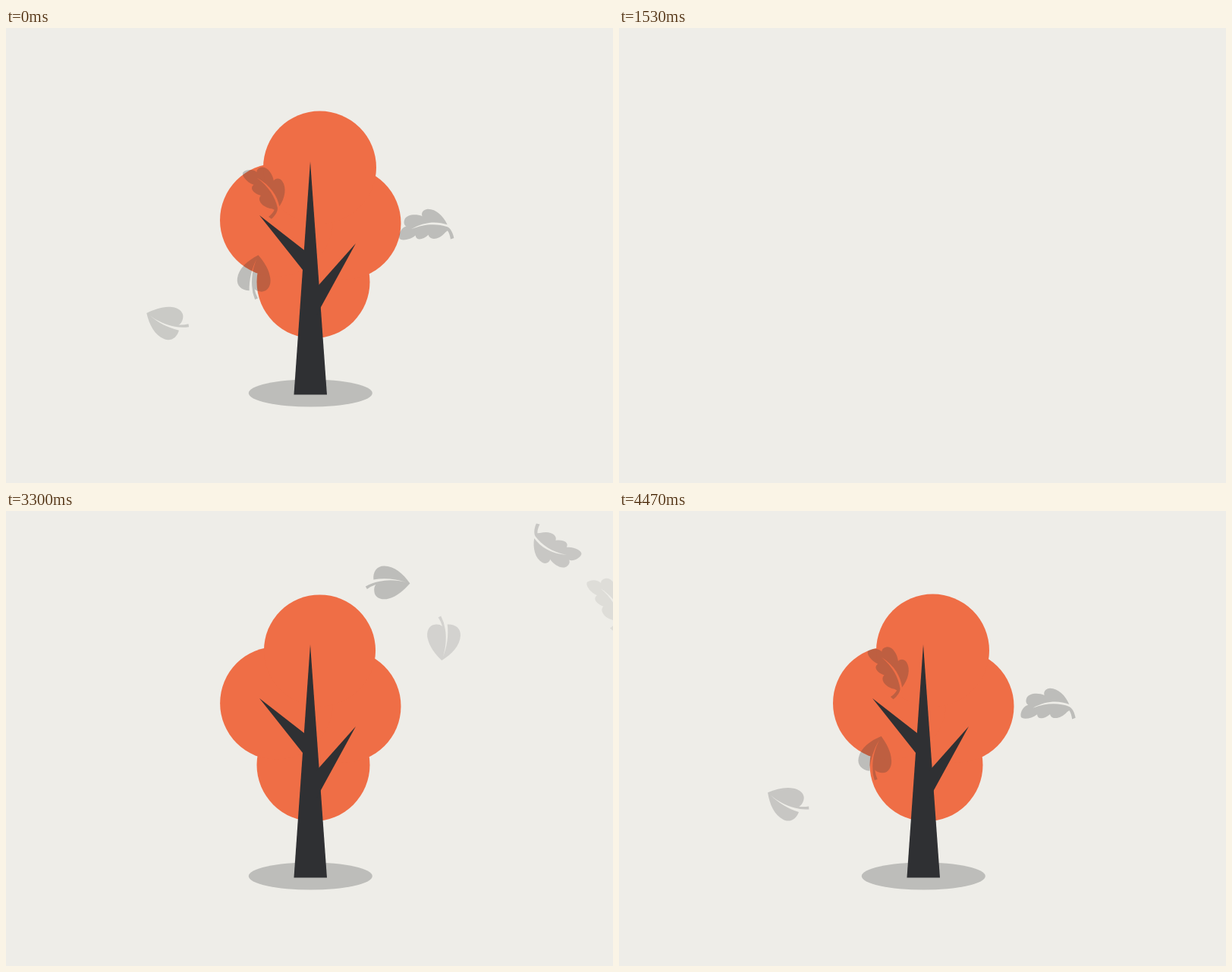
Write an HTML page with a canvas that moves like this. It is 800 px wide and 600 px high and loops after 4.5 s.

```html
<!DOCTYPE html>
<html lang="en">
<head>
<meta charset="utf-8">
<title>Autumn tree</title>
<style>
  html, body { margin: 0; width: 100%; height: 100%; overflow: hidden; background: #eeede8; }
  canvas { display: block; width: 800px; height: 600px; }
</style>
</head>
<body>
<canvas id="stage" width="800" height="600"></canvas>
<script>
const LOOP = 4500, GROUND = 483.5, DEPTH = 310;
const DARK = '#2f3033', ORANGE = '#ef6e46', SHADE = .25;
const ctx = document.getElementById('stage').getContext('2d');

// Leaf outlines around their own centre, with a slit for the vein
const HEART = new Path2D(`M29 1C20-12 8-22-5-22C-15-22-20-14-19-4C-5-6.5 11-5 24-.3
  C12-3.5 0-4-12-1.5Q-21 0-29.5 5L-27.5 8.5Q-22 4.5-16 2.5C-18 5-18.5 8-18 12
  C-17 21-7 23.5 1 21C12 18 21 10 29 1Z`);
const OAK = new Path2D(`M29 0C24-12 14-22 3-21.5C-2-21-5-17-3.5-12.5C-11-16-24-16-27-9
  C-29-4-27-1-25 0C-31 1-36 9-35 15C-34 19-22 19-13.5 12.5C-13 20-4 19 3.5 12.5
  C5 20 17 20 26 10L29 8C31 11 32 15 32.5 19.5L37 18
  C36 11 33 5 29 3C16-2 0-3-19 4C0-6 16-5 29 0Z`);

// Each leaf drifts on a cubic curve that passes its points at these times
const STOPS = [3300, 4050, 4485, 5100];
const leaves = [
  { shape: HEART, angle: 0, spin: -.1315, fadeAt: 4370,
    path: [[503, 94], [401, 326], [217, 386.3], [250, 419]] },
  { shape: OAK, angle: 212, spin: -.1295, fadeAt: 4620,
    path: [[720.5, 51], [578, 166], [352, 209], [211, 351]] },
  { shape: HEART, angle: 93, spin: -.1455, fadeAt: 4916,
    path: [[576.5, 168], [500, 282], [333.2, 326.5], [219.3, 396.5]] },
  { shape: OAK, angle: 60, spin: -.052, fadeAt: 4818,
    path: [[796.5, 116.5], [708.6, 193.6], [558.9, 257.8], [304.7, 384.6]] }
];

// Parts are listed in the order in which they grow and shrink
const crowns = [[405, 334.7], [446, 257.4], [356.5, 253.4], [413.5, 184]];
const branches = [
  { root: [394, 305], outline: [[334, 247], [396, 295.3], [396, 325.3]] },
  { root: [412, 348], outline: [[461, 284], [409, 342.5], [409, 379]] }
];
const trunk = [[401, 176], [425.6, 520], [376.9, 520]];

const part = (t, from, len) => Math.min(1, Math.max(0, (t - from) / len));
const sine = p => (1 - Math.cos(Math.PI * p)) / 2;
const outQuad = p => 1 - (1 - p) ** 2;
const outCubic = p => 1 - (1 - p) ** 3;
const backIn = p => p * p * (2.05 * p - 1.05);

// Lagrange interpolation of one coordinate
const along = (path, t, axis) => path.reduce((sum, point, i) => sum + STOPS.reduce(
  (w, stop, j) => i === j ? w : w * (t - stop) / (STOPS[i] - stop), point[axis]), 0);

function disc(x, y, rx, ry = rx) {
  ctx.beginPath();
  ctx.ellipse(x, y, rx, ry, 0, 0, 2 * Math.PI);
  ctx.fill();
}

function polygon(points) {
  ctx.beginPath();
  points.forEach(([x, y]) => ctx.lineTo(x, y));
  ctx.fill();
}

// Everything below the ground line is hidden
function aboveGround(drop, paint) {
  ctx.save();
  ctx.beginPath();
  ctx.rect(0, 0, 800, GROUND);
  ctx.clip();
  ctx.translate(0, drop);
  paint();
  ctx.restore();
}

function drawShadow(size) {
  ctx.globalAlpha = SHADE;
  ctx.fillStyle = DARK;
  disc(401.3, 481.5, 81.5 * size, 18 * size);
  ctx.globalAlpha = 1;
}

function drawLeaf({ shape, angle, spin, fadeAt, path }, i, t) {
  const alpha = SHADE * part(t, 3080 + 50 * i, 220) * (1 - part(t, fadeAt, 490));
  if (alpha <= 0) return;
  const drift = Math.max(t, STOPS[0]);
  ctx.save();
  ctx.globalAlpha = alpha;
  ctx.fillStyle = DARK;
  ctx.translate(along(path, drift, 0), along(path, drift, 1));
  ctx.rotate((angle + spin * (t - STOPS[0])) * Math.PI / 180);
  ctx.fill(shape);
  ctx.restore();
}

function draw(t) {
  const growing = t > 2000;
  const drop = DEPTH * (growing ? 1 - outQuad(part(t, 2397, 530)) : backIn(part(t, 986, 300)));
  const leafTime = t < 1500 ? t + LOOP : t;

  ctx.clearRect(0, 0, 800, 600);
  drawShadow(growing ? outQuad(part(t, 2398, 400)) : 1 - sine(part(t, 1235, 300)));

  aboveGround(drop, () => {
    ctx.fillStyle = ORANGE;
    crowns.forEach(([x, y], i) => {
      const size = growing ? outCubic(part(t, 2850 + 48 * i, 400))
        : 1 - sine(part(t, 1081 + 12 * i ** (5 / 3), 300));
      disc(x, y, 74.5 * size);
    });
  });

  leaves.forEach((leaf, i) => drawLeaf(leaf, i, leafTime));

  aboveGround(drop, () => {
    ctx.fillStyle = DARK;
    polygon(trunk);
    branches.forEach(({ root: [x, y], outline }, i) => {
      const size = growing ? outQuad(part(t, 2580 + 40 * i, 330))
        : 1 - part(t, 1060 + 20 * i, 170);
      polygon(outline.map(([px, py]) => [x + size * (px - x), y + size * (py - y)]));
    });
  });
}

function tick() {
  draw(performance.now() % LOOP);
  requestAnimationFrame(tick);
}
tick();
</script>
</body>
</html>
```
